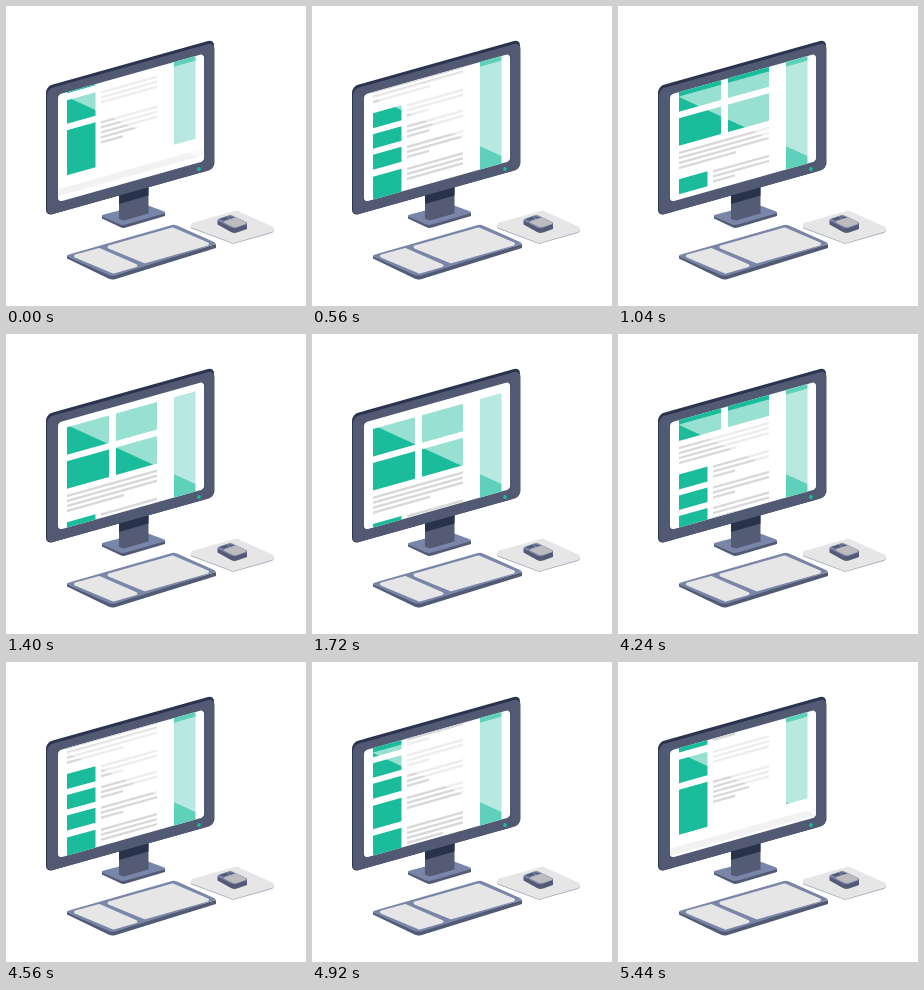
These frames come from a looping animation (300x300 px, 5480 ms). An HTML page:

```html
<!DOCTYPE html>
<html lang="en">
<head>
<meta charset="utf-8">
<title>Scrolling page on a monitor</title>
<style>
html, body { margin: 0; width: 100%; height: 100%; overflow: hidden; background: #fff; }
svg { display: block; width: 100vw; height: 100vh; }
</style>
</head>
<body>
<svg viewBox="0 0 300 300">
  <defs>
    <clipPath id="screen"><rect x="-9" y="86" width="146" height="107.500" rx="4"/></clipPath>
  </defs>

  <!-- stand -->
  <path d="M96 209.500V212.500L114 221Q117 222.500 120 221.500L159 210V206.500L116 216Z" fill="#525a75"/>
  <path d="M98 208.500L138 198L157 205Q160.500 206.500 157 207.800L120 218.500Q116.500 219.500 113 218L97 211Q94.500 209.500 98 208.500Z" fill="#7a86a8"/>
  <path d="M113 186L142.500 178V207.500L118 214.500L113 213Z" fill="#535b75"/>
  <path d="M113 186L142.500 178V189.500L113 198Z" fill="#28324a"/>

  <!-- monitor -->
  <g transform="matrix(1 -.28 0 1 61 0)">
    <rect x="-21" y="74.500" width="168" height="129.500" rx="6" fill="#2b344f"/>
    <rect x="-20" y="77.700" width="167.500" height="126.500" rx="6" fill="#525972"/>
    <rect x="-9" y="86" width="146" height="107.500" rx="4" fill="#fff"/>
    <g clip-path="url(#screen)"><g id="page"></g></g>
  </g>
  <path d="M61 90.500L190 54.400L198 52.200V154L61 91Z" fill="#fff" fill-opacity=".55"/>
  <circle cx="193" cy="163" r="1.900" fill="#1abc9c"/>

  <!-- keyboard -->
  <path d="M61 249.500V252.500L103 272.800Q106 274.200 109 273.200L210 242V238L106 269Z" fill="#525a75"/>
  <path d="M63 248.500L166 219Q168.500 218.300 171 219.500L208 236Q211 237.500 208 238.500L110 269.300Q106 270.500 102.500 269L62 251Q60 249.500 63 248.500Z" fill="#7a86a8"/>
  <g fill="#e6e6e6" stroke="#e6e6e6" stroke-width="3" stroke-linejoin="round">
    <path d="M69.500 250L93.500 243.500L130 259.500L107.500 266Z"/>
    <path d="M103 241L166.500 223L201.500 238L139 255.800Z"/>
  </g>

  <!-- mouse and pad -->
  <g stroke-width="6" stroke-linejoin="round">
    <path d="M188 220.200L230.500 208.500L265 224L227 234.800Z" fill="#a6abba" stroke="#a6abba"/>
    <path d="M188 219.300L230.500 207.700L265 223.200L227 234Z" fill="#e6e6e6" stroke="#e6e6e6"/>
  </g>
  <path d="M211.500 214V218.500L225 226Q228 227.500 231 226.500L241 223V218L228 220Z" fill="#525a75"/>
  <path d="M213.500 212.500L222 209.500Q224.500 208.500 227 209.700L240 216Q242.500 217.500 240 218.500L231 221.800Q228 223 225 221.500L212.500 215Q210.500 213.500 213.500 212.500Z" fill="#7a86a8"/>
  <path d="M218.500 215L230 211.500L239.500 216.300Q241 217.300 239.500 218L231 221Q228.500 221.800 226 220.600L218 216.500Z" fill="#bcbcbf"/>
  <path d="M213.500 213L222 210.300L228.500 211.300L217.500 214.800Z" fill="#525a75"/>
  <path d="M221 210.500L224 213" stroke="#a6abba" stroke-width=".8"/>
</svg>
<script>
const LOOP = 5480, STEP = 40;
const UP_START = 220, UP_END = 1720, DOWN_START = 3680;
const SPEED = 177 / 2000;
const TEAL = '#1abc9c', SIDE = '#5fd0ba', LINE = '#d8d8d8', FOOT = '#f2f2f2';
const page = document.getElementById('page');

function box(x, y, w, h, fill) {
  const r = document.createElementNS('http://www.w3.org/2000/svg', 'rect');
  Object.entries({ x, y, width: w, height: h, fill }).forEach(([k, v]) => r.setAttribute(k, v));
  page.appendChild(r);
}

function lines(x, y, widths) {
  widths.forEach((w, i) => box(x, y + i * 5, w, 2.4, LINE));
}

function buildPage() {
  for (const y of [95, 129])
    for (const x of [0, 49]) box(x, y, x ? 41 : 42, 27.5, TEAL);
  lines(0, 162.5, [90, 90, 90, 57]);

  // list items: top, height, text line widths
  const items = [
    [190, 15, [56, 56, 22]],
    [211, 14.5, [56, 56, 22]],
    [231.5, 15, [56, 56, 22]],
    [253.5, 23.5, [56, 56, 56]],
    [283.5, 45, [56, 56, 56, 36, 22]]
  ];
  for (const [y, h, text] of items) {
    box(0, y, 28.5, h, TEAL);
    lines(34, y + 0.5, text);
  }
  box(107, 95, 21.5, 233, SIDE);
  box(-9, 340, 146, 7, FOOT);
}

function scrollAt(t) {
  if (t >= DOWN_START) return (t - DOWN_START) * SPEED;
  if (t < UP_START) return (t + LOOP - DOWN_START) * SPEED;
  if (t >= UP_END) return 0;
  const left = (UP_END - t) / (UP_END - UP_START);
  return (UP_START + LOOP - DOWN_START) * SPEED * left ** 3;
}

function draw(ms) {
  const t = Math.floor((ms % LOOP) / STEP) * STEP;
  page.setAttribute('transform', `translate(0 ${-scrollAt(t).toFixed(2)})`);
}

buildPage();
const start = performance.now();
function tick() {
  draw(performance.now() - start);
  requestAnimationFrame(tick);
}
tick();
</script>
</body>
</html>
```
